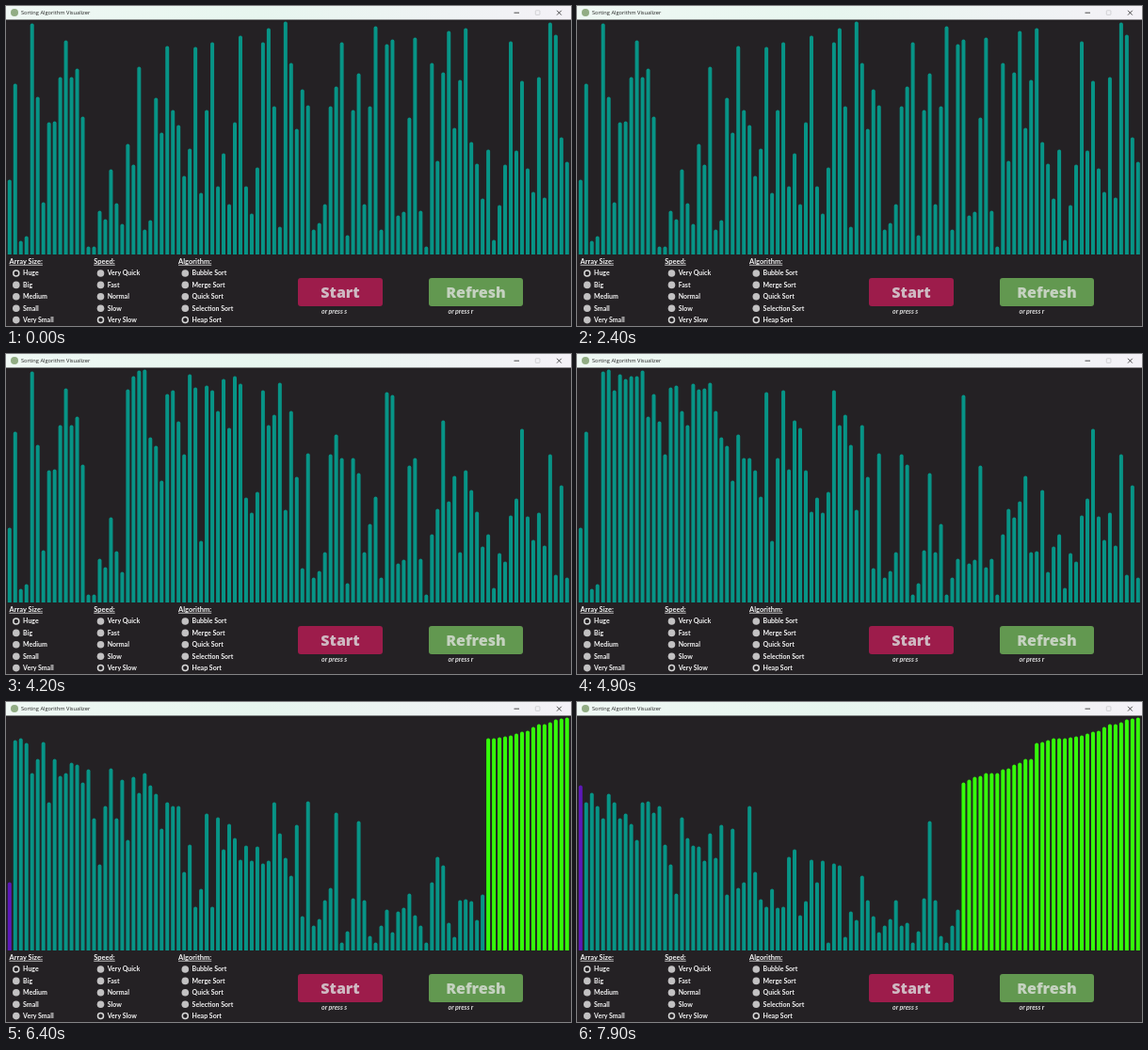
Write an HTML page that moves like this. It is 600 px wide and 340 px high and loops after 8 s.

```html
<!DOCTYPE html>
<html lang="en">
<head>
<meta charset="utf-8">
<title>Sorting Algorithm Visualizer</title>
<style>
  html, body { margin: 0; width: 100%; height: 100%; overflow: hidden; background: #242124; }
  svg { display: block; width: 600px; height: 340px; }
  .title { font: 5.7px "Open Sans", "Noto Sans", sans-serif; fill: #222; }
  .label { font: 700 7px Lato, "Open Sans", sans-serif; fill: #f4f4f4; }
  .head { font-size: 7.5px; text-decoration: underline; }
  .hint { font-style: italic; fill: #dedede; }
  .button { font: 800 16px "Open Sans", Roboto, sans-serif; font-stretch: 75%; text-anchor: middle; }
</style>
</head>
<body>
<svg id="stage" viewBox="0 0 600 340">
  <defs>
    <linearGradient id="chrome">
      <stop offset="0" stop-color="#eff8f4"/>
      <stop offset=".45" stop-color="#e7f6ef"/>
      <stop offset="1" stop-color="#f4f1f7"/>
    </linearGradient>
  </defs>
  <rect width="600" height="340" fill="#242124"/>
  <rect width="600" height="14.5" fill="url(#chrome)"/>
  <circle cx="9" cy="7" r="4" fill="#91ad84"/>
  <text class="title" x="16" y="9.3">Sorting Algorithm Visualizer</text>
  <path d="M539.5 7.2h5.5M585 4.8l4.8 4.8m0-4.8l-4.8 4.8" stroke="#222" stroke-width=".8" fill="none"/>
  <rect x="562.3" y="4.8" width="4.6" height="4.6" rx=".6" fill="none" stroke="#c4c4c8" stroke-width=".7"/>
  <g id="bars"></g>
  <g id="panel"></g>
</svg>
<script>
const LOOP = 8000, TICK = 100;
const BUILD_START = 3010, BUILD_STEP = 41;
const SORT_START = 5065, SORT_RATE = 0.0115;
const BASE = 264;
const COLORS = { idle: '#079486', root: '#5c18b8', done: '#35fb0a' };

// Top edge of each bar: a smaller number is a larger value.
const tops = [
  185, 83, 250, 245, 19, 97, 209, 124, 123, 76, 37, 76, 67, 118, 256, 256, 218, 227, 174, 210,
  232, 147, 169, 65, 238, 228, 98, 135, 43, 111, 127, 181, 152, 44, 199, 111, 39, 192, 157, 211,
  124, 32, 192, 221, 172, 39, 24, 107, 235, 17, 61, 131, 89, 106, 238, 231, 211, 107, 86, 39,
  244, 111, 72, 211, 107, 22, 238, 41, 36, 223, 219, 119, 34, 218, 256, 61, 165, 71, 27, 130,
  79, 24, 145, 168, 205, 153, 249, 212, 169, 38, 154, 80, 173, 198, 76, 204, 18, 31, 140, 166
];
const count = tops.length;

function add(parent, name, attrs, text) {
  const node = document.createElementNS('http://www.w3.org/2000/svg', name);
  for (const key in attrs) node.setAttribute(key, attrs[key]);
  if (text) node.textContent = text;
  return parent.appendChild(node);
}

const swap = (a, i, j) => { [a[i], a[j]] = [a[j], a[i]]; };

function sift(a, root, size) {
  for (;;) {
    let best = root;
    for (const child of [2 * root + 1, 2 * root + 2]) {
      if (child < size && a[child] < a[best]) best = child;
    }
    if (best === root) return;
    swap(a, root, best);
    root = best;
  }
}

// Snapshots of the heap being built, then two per extraction: swapped and sifted.
const building = [tops.slice()];
const sorting = [];
const work = tops.slice();
for (let i = count / 2 - 1; i >= 0; i--) {
  sift(work, i, count);
  building.push(work.slice());
}
sorting.push(work.slice(), work.slice());
for (let size = count - 1; size > 0; size--) {
  swap(work, 0, size);
  sorting.push(work.slice());
  sift(work, 0, size);
  sorting.push(work.slice());
}

const bars = tops.map((_, i) => add(document.getElementById('bars'), 'path', {}));

function drawBars(values, sorted, active) {
  bars.forEach((bar, i) => {
    const x = 1.8 + 5.98 * i;
    bar.setAttribute('d', `M${x} ${BASE}V${values[i] + 1.5}a2 2 0 0 1 4 0V${BASE}z`);
    bar.setAttribute('fill', i >= count - sorted ? COLORS.done : active && i === 0 ? COLORS.root : COLORS.idle);
  });
}

function render(ms) {
  const t = Math.floor(ms % LOOP / TICK) * TICK;
  if (t < SORT_START) {
    const step = Math.floor((t - BUILD_START) / BUILD_STEP);
    drawBars(building[Math.max(0, Math.min(step, building.length - 1))], 0, false);
  } else {
    const progress = (t - SORT_START) * SORT_RATE;
    drawBars(sorting[Math.floor(progress * 2)], Math.floor(progress), true);
  }
}

const panel = document.getElementById('panel');

function radioGroup(x, title, options, selected) {
  add(panel, 'text', { class: 'label head', x, y: 273.8 }, title);
  options.forEach((option, i) => {
    const y = 284 + 12.4 * i;
    const ring = i === selected;
    add(panel, 'circle', {
      cx: x + 7.3, cy: y, r: ring ? 3 : 3.8,
      fill: ring ? 'none' : '#c2c1c2', stroke: ring ? '#d8d8d8' : 'none', 'stroke-width': 1.5
    });
    add(panel, 'text', { class: 'label', x: x + 14.6, y: y + 2.4 }, option);
  });
}

function button(x, width, fill, ink, text, hintX, hint) {
  add(panel, 'rect', { x, y: 289, width, height: 30, rx: 3, fill });
  add(panel, 'text', { class: 'button', x: x + width / 2, y: 309.7, fill: ink }, text);
  add(panel, 'text', { class: 'label hint', x: hintX, y: 327 }, hint);
}

radioGroup(3.5, 'Array Size:', ['Huge', 'Big', 'Medium', 'Small', 'Very Small'], 0);
radioGroup(93.2, 'Speed:', ['Very Quick', 'Fast', 'Normal', 'Slow', 'Very Slow'], 4);
radioGroup(183, 'Algorithm:', ['Bubble Sort', 'Merge Sort', 'Quick Sort', 'Selection Sort', 'Heap Sort'], 4);
button(310, 90, '#9d1c4b', '#cfb9c2', 'Start', 335, 'or press s');
button(449, 100, '#629850', '#c5d2c0', 'Refresh', 469.5, 'or press r');

const start = performance.now();
function frame() {
  render(performance.now() - start);
  requestAnimationFrame(frame);
}
frame();
</script>
</body>
</html>
```
